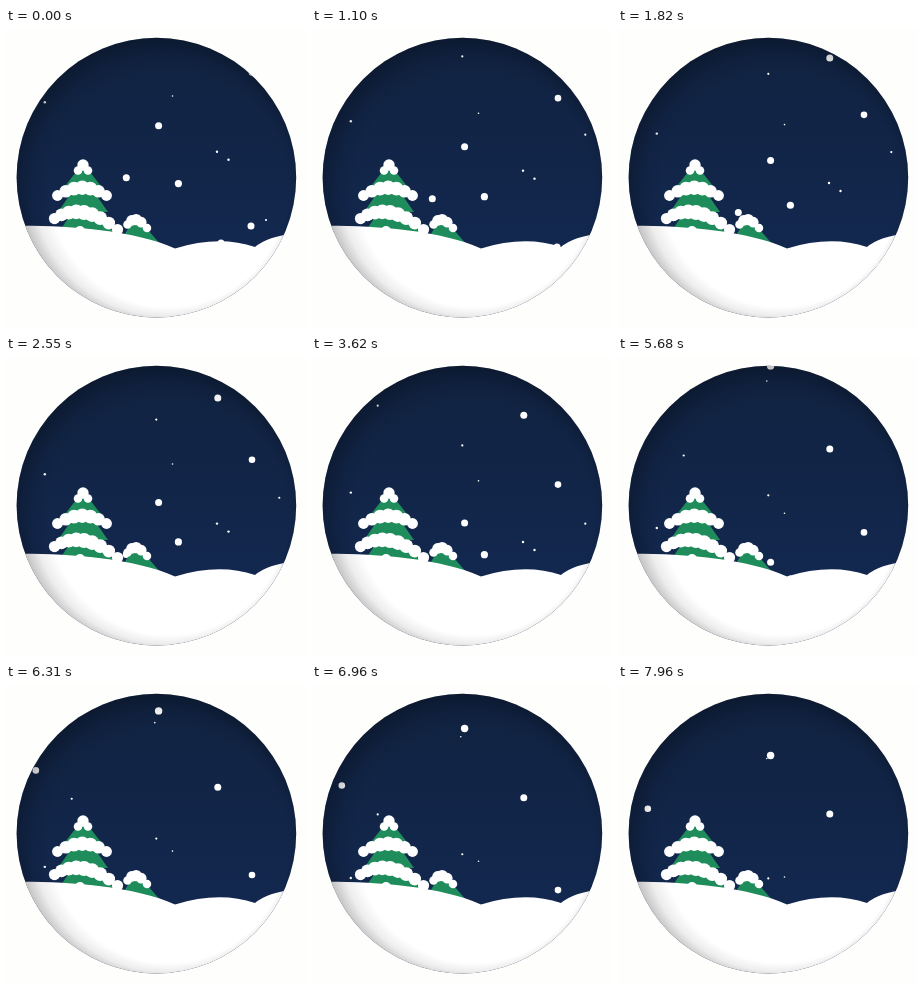
An HTML page with a canvas that plays this animation: 300 by 300 pixels, repeating every 8 s.

```html
<!DOCTYPE html>
<html lang="en">
<head>
<meta charset="utf-8">
<title>Snowy night</title>
<style>
html, body { margin: 0; width: 100%; height: 100%; overflow: hidden; background: #fefefc; }
canvas { display: block; width: 300px; height: 300px; }
</style>
</head>
<body>
<canvas id="stage"></canvas>
<script>
const SIZE = 300, LOOP = 8000;
const CX = 150.4, CY = 149.6, R = 139.8;
const GREEN = '#1f8d5b', SNOW = '#fff';

const canvas = document.getElementById('stage');
const ctx = canvas.getContext('2d');
const dpr = window.devicePixelRatio || 1;
canvas.width = canvas.height = SIZE * dpr;

function dot(x, y, r) {
  ctx.beginPath();
  ctx.arc(x, y, r, 0, Math.PI * 2);
  ctx.fill();
}

// Flakes of one size falling together; starts are positions at time zero.
function fall(t, radius, speed, ...starts) {
  starts.forEach(([x, y]) => dot(x, y + speed * t, radius));
}

function drawFlakes(t) {
  ctx.fillStyle = SNOW;
  fall(t, 3.6, 11.9, [172.4, 155.6]);
  fall(t, 3.5, 16.3, [211.8, 0.3]);
  fall(t, 3.5, 19.1, [152.6, 97.8], [120.3, 149.8], [245, 198], [215, 215]);
  fall(t, 3.3, 23.2, [246, 44.6], [29.8, -60]);
  fall(t, 3.7, 27, [152.6, -143.5]);
  fall(t, 0.8, 15.7, [166.5, 68]);
  fall(t, 1.2, 17.2, [211, 123.7], [222.5, 131.7], [38.8, 74.3]);
  fall(t, 0.8, 21.7, [148.8, -98.3]);
  fall(t, 1.1, 24.2, [150.3, 1.8], [273.3, 80], [65.7, -38], [260, 192]);
}

function triangle(x, top, left, right, bottom) {
  ctx.fillStyle = GREEN;
  ctx.beginPath();
  ctx.moveTo(x, top);
  ctx.lineTo(left, bottom);
  ctx.lineTo(right, bottom);
  ctx.fill();
}

// Snow clumps along a curve, thickest in the middle.
function drift([x0, y0], [x1, y1], [x2, y2], clumps, radius) {
  ctx.fillStyle = SNOW;
  for (let i = 0; i < clumps; i++) {
    const u = i / (clumps - 1), v = 1 - u;
    dot(v * v * x0 + 2 * u * v * x1 + u * u * x2,
        v * v * y0 + 2 * u * v * y1 + u * u * y2,
        radius * (0.75 + 0.25 * Math.sin(Math.PI * u)));
  }
}

function drawBigTree() {
  triangle(77, 135, 56, 98, 162);
  triangle(77, 148, 52, 102, 184);
  triangle(77, 168, 51, 110, 207);
  drift([72, 142.5], [77, 131.5], [82, 142.5], 3, 5.7);
  drift([51.5, 167.5], [76.5, 152], [100.5, 167.5], 7, 7.2);
  drift([48.5, 190.5], [76, 173], [111.5, 201.5], 9, 7.5);
  dot(74, 203, 5);
}

function drawSmallTree() {
  triangle(130, 188, 112, 155, 217);
  drift([121.5, 196.5], [129, 185], [141, 200], 5, 5.7);
}

function drawGround() {
  ctx.fillStyle = SNOW;
  ctx.beginPath();
  ctx.moveTo(0, 198);
  ctx.bezierCurveTo(55, 197, 125, 201, 169, 220.5);
  ctx.quadraticCurveTo(213, 207, 249, 219);
  ctx.quadraticCurveTo(262, 207, 300, 204);
  ctx.lineTo(300, 300);
  ctx.lineTo(0, 300);
  ctx.fill();
}

function drawShade() {
  const shade = ctx.createRadialGradient(163, 161, 118, 153, 153, 143);
  shade.addColorStop(0, 'rgba(0,0,0,0)');
  shade.addColorStop(0.5, 'rgba(0,0,0,.07)');
  shade.addColorStop(1, 'rgba(0,0,0,.26)');
  ctx.fillStyle = shade;
  ctx.fillRect(0, 0, SIZE, SIZE);
}

function drawSky() {
  const sky = ctx.createLinearGradient(0, 9, 0, 220);
  sky.addColorStop(0, '#102240');
  sky.addColorStop(1, '#13284f');
  ctx.fillStyle = sky;
  ctx.fillRect(0, 0, SIZE, SIZE);
}

function draw(now) {
  ctx.setTransform(dpr, 0, 0, dpr, 0, 0);
  ctx.fillStyle = '#fefefc';
  ctx.fillRect(0, 0, SIZE, SIZE);

  ctx.save();
  ctx.beginPath();
  ctx.arc(CX, CY, R, 0, Math.PI * 2);
  ctx.clip();
  drawSky();
  drawFlakes((now % LOOP) / 1000);
  drawBigTree();
  drawSmallTree();
  drawGround();
  drawShade();
  ctx.restore();
}

const start = performance.now();
function tick() {
  draw(performance.now() - start);
  requestAnimationFrame(tick);
}
tick();
</script>
</body>
</html>
```
